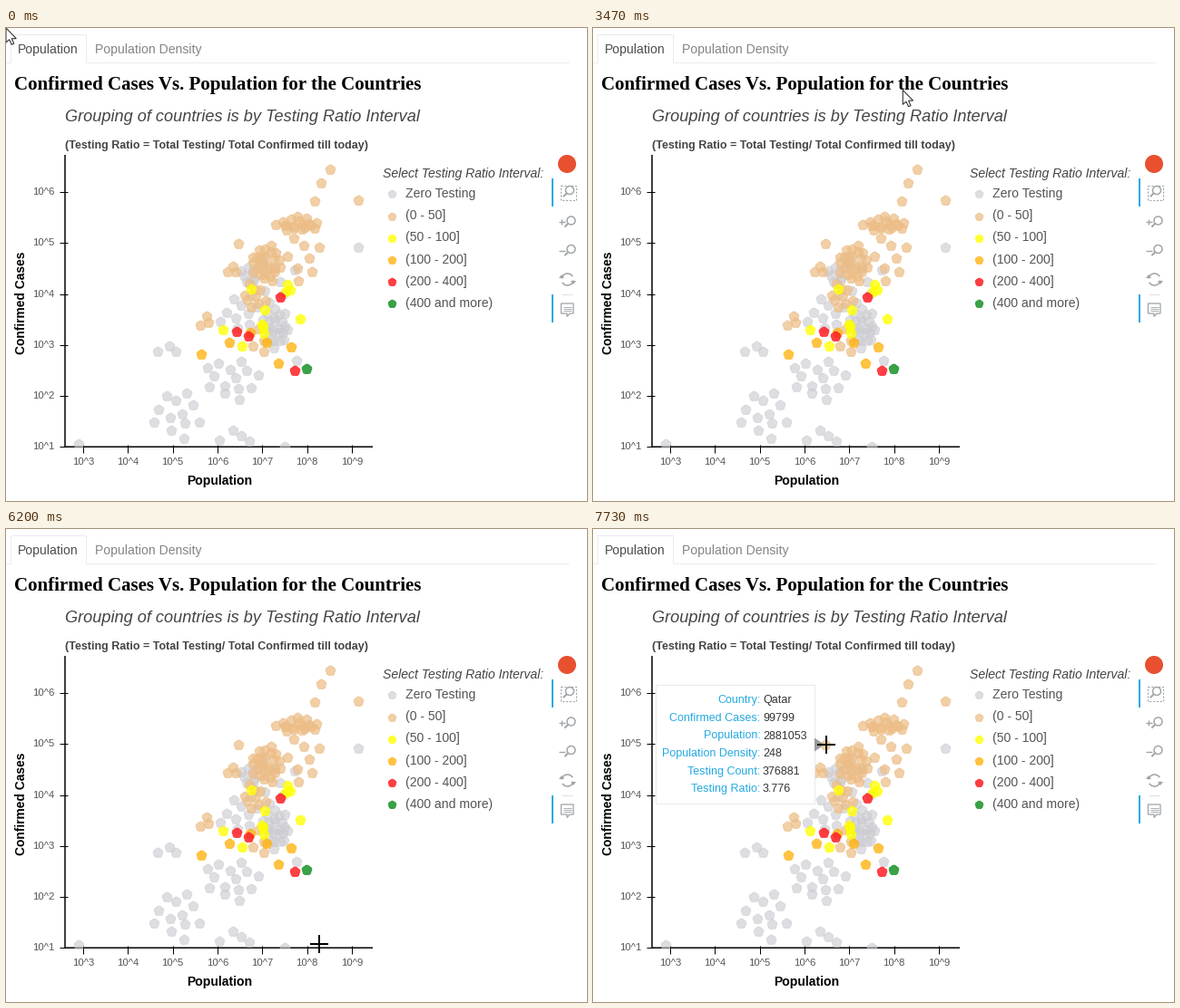
A matplotlib script that plays this animation: 640x522 px, repeating every 8 s.

```python
import numpy as np
import matplotlib.pyplot as plt
from matplotlib.animation import FuncAnimation
from matplotlib.patches import Arc, Circle, Polygon, Rectangle
from matplotlib.path import Path

W, H, DPI = 640, 522, 64
PX = 72 / DPI                      # points per pixel
FRAMES, STEP = 120, 200 / 3        # 8 seconds

BLUE, ICON, TAB = "#26aae1", "#a1a6a9", "#ececec"
LEFT, RIGHT, TOP, BOTTOM = 65, 403, 140, 462

fig = plt.figure(figsize=(W / DPI, H / DPI), dpi=DPI, facecolor="white")
ax = fig.add_axes([0, 0, 1, 1])
ax.set(xlim=(0, W), ylim=(H, 0))
ax.axis("off")


def text(x, y, s, size, color="#444444", family="Liberation Sans", **kw):
    return ax.text(x, y, s, fontsize=size * PX, color=color, family=family, **kw)


def line(xs, ys, color="black", width=1.0, **kw):
    return ax.plot(xs, ys, color=color, lw=width * PX,
                   solid_capstyle="butt", **kw)[0]


def patch(shape):
    return ax.add_patch(shape)


# ---- tabs and headings
line([0, 4.5, 4.5, 87.5, 87.5, 620], [37.5, 37.5, 6.5, 6.5, 37.5, 37.5], TAB)
text(13, 28, "Population", 14, "#4d4d4d")
text(98, 28, "Population Density", 14, "#858585")
text(9, 68, "Confirmed Cases Vs. Population for the Countries", 21.05, "black",
     "Liberation Serif", weight="bold")
text(65, 103, "Grouping of countries is by Testing Ratio Interval", 18.1,
     style="italic")
text(65, 132.5, "(Testing Ratio = Total Testing/ Total Confirmed till today)",
     12.55, weight="bold")

# ---- axes
line([65, 65], [TOP, BOTTOM + 1], width=1.5, snap=False)
line([LEFT, RIGHT + 1], [462.2, 462.2], width=1.5, snap=False)
for i in range(7):
    x = 85 + 49.3 * i
    line([x, x], [460, 469])
    text(x, 482, f"10^{i + 3}", 11.2, "#555555", ha="center")
for i in range(6):
    y = 462.2 - 56.2 * i
    line([58.5, 67.5], [y, y])
    text(53.5, y + 3, f"10^{i + 1}", 11.2, "#555555", ha="right")
text(235, 503.6, "Population", 14, "black", weight="bold", ha="center")
text(17, 303, "Confirmed Cases", 13.8, "black", weight="bold", rotation=90,
     ha="center", va="center")

# ---- data: a few key points per group, the rest scattered in ellipses
rng = np.random.default_rng(5)


def blob(n, x, y, rx, ry):
    """Spread n points over an ellipse by the golden angle, slightly shaken."""
    k = np.arange(n)
    rad, ang = np.sqrt((k + 0.5) / n), 2.4 * k
    shake = rng.uniform(-2, 2, (n, 2))
    return list(np.column_stack([x + rx * rad * np.cos(ang),
                                 y + ry * rad * np.sin(ang)]) + shake)


zero = ([(80, 459), (388, 242), (320, 367), (307, 462)]
        + blob(22, 297, 331, 14, 23) + blob(12, 260, 315, 28, 24)
        + blob(7, 267, 269, 13, 10) + blob(8, 295, 280, 30, 28)
        + blob(14, 247, 388, 32, 26) + blob(12, 188, 425, 30, 28)
        + blob(3, 178, 356, 22, 4) + blob(4, 250, 450, 32, 8))
low = ([(357, 156), (347, 171), (340, 191), (388, 190), (256, 238)]
       + blob(18, 322, 217, 24, 8) + blob(26, 287, 260, 17, 20)
       + blob(8, 328, 255, 26, 28) + blob(9, 272, 296, 14, 15)
       + blob(3, 250, 267, 8, 4) + blob(3, 218, 325, 9, 10)
       + blob(4, 278, 346, 14, 16))
mid = ([(270, 288), (324, 321), (239, 333), (260, 351)]
       + blob(3, 312, 288, 5, 4) + blob(4, 283, 325, 3, 16))
high = [(215, 360), (246, 347), (269, 336), (287, 347), (314, 352), (300, 370)]
top = [(302, 297), (254, 335), (267, 340), (318, 378)]

GROUPS = [
    ("Zero Testing", "#cbcbd1", 0.62, zero),
    ("(0 - 50]", "#ecbd86", 0.72, low),
    ("(50 - 100]", "#ffff00", 0.78, mid),
    ("(100 - 200]", "#ffb414", 0.8, high),
    ("(200 - 400]", "#ff1e24", 0.85, top),
    ("(400 and more)", "#179227", 0.85, [(331, 376)]),
]

a = np.linspace(0, 2 * np.pi, 81)
r = 0.78 + 0.22 * np.sqrt(np.abs(np.cos(2.5 * a)))
flower = Path(np.column_stack([r * np.sin(a), r * np.cos(a)]), closed=True)
plot_area = Rectangle((LEFT, TOP), RIGHT - LEFT, BOTTOM - TOP + 1,
                      transform=ax.transData)


def flowers(points, color, alpha, size):
    xs, ys = zip(*points)
    return ax.scatter(xs, ys, s=(size * PX) ** 2, marker=flower, facecolor=color,
                      edgecolor=color, linewidth=0.8 * PX, alpha=alpha, zorder=3)


text(415, 165, "Select Testing Ratio Interval:", 14, style="italic")
for i, (label, color, alpha, points) in enumerate(GROUPS):
    y = 182.8 + 24.2 * i
    flowers(points, color, alpha, 11).set_clip_path(plot_area)
    flowers([(424.5, y + 0.5)], color, alpha, 8.8)
    text(440, y + 4.2, label, 14, "#555555")


# ---- toolbar
def lens(x, y, radius=4.5):
    patch(Circle((x, y), radius, fill=False, ec=ICON, lw=1.5 * PX))
    d = radius * 0.7
    line([x - d, x - d - 4], [y + d, y + d + 4], ICON, 2)


patch(Circle((618, 150), 10, fc="#e8502f", ec="none"))
for y in (166, 294):
    line([602, 602], [y, y + 31], BLUE, 2)
patch(Rectangle((610.5, 173.5), 17, 16, fill=False, ec=ICON, lw=1.1 * PX,
                ls=(0, (2, 1.5))))
lens(621, 179)
for y in (213, 244.5):
    lens(622.5, y - 0.5)
    line([609, 615.5], [y + 1, y + 1], ICON, 1.4)
line([612.2, 612.2], [210.8, 217.2], ICON, 1.4)
for side in (-1, 1):
    start = 10 if side < 0 else 190
    patch(Arc((618.5, 277.5), 13, 13, theta1=start, theta2=start + 140,
              ec=ICON, lw=1.6 * PX))
    x, y = 618.5 - 6.5 * side, 277.5 - 1.5 * side
    patch(Polygon([(x - 3, y), (x + 3, y), (x, y - 4 * side)], fc=ICON, ec="none"))
line([612, 624], [293.5, 293.5], "#e0e0e0")
patch(Polygon([(611.5, 304), (625, 304), (625, 315), (621, 315), (618, 318.5),
               (618, 315), (611.5, 315)], fill=False, ec=ICON, lw=1.3 * PX))
for y in (307.5, 309.8, 312):
    line([614, 622.5], [y, y], ICON, 0.9)

# ---- tooltip
ROWS = {"Country": "Qatar", "Confirmed Cases": 99799, "Population": 2881053,
        "Population Density": 248, "Testing Count": 376881,
        "Testing Ratio": 3.776}
tip = [
    patch(Rectangle((68.5, 171.5), 175.5, 131, fc="white", ec="#e8e8e8",
                    lw=PX, alpha=0.95, zorder=6)),
    patch(Polygon([(244, 230.5), (244, 245.5), (255, 238)], fc="#9b9b9b",
                  ec="none", zorder=6)),
]
for i, (key, value) in enumerate(ROWS.items()):
    y = 192.3 + 19.6 * i
    tip.append(text(184.5, y, key + ":", 12.5, BLUE, ha="right", zorder=7))
    tip.append(text(187, y, value, 12.5, "#333333", zorder=7))

# ---- pointer: an arrow, or a cross inside the plot
ARROW = np.array([(0.5, 0.5), (0.5, 16.5), (4.2, 13.2), (6.7, 18.8), (9.2, 17.7),
                  (6.8, 12.2), (11.8, 12.2)])
arrow = patch(Polygon(ARROW, fc="white", ec="#333333", lw=1.1 * PX, zorder=9))
cross = [line([0, 0], [0, 0], width=2, zorder=9) for _ in range(2)]

# key poses: tick, x, y
TRACK = np.array([
    (18, 573, 249), (30, 52, 178), (37, 46, 67), (39, 46, 67), (43, 175, 70),
    (57, 390, 67), (67, 440, 73), (71, 440, 73), (76, 496, 140), (84, 419, 335),
    (89, 417, 350), (93, 345, 458), (96, 325, 488), (103, 308, 310),
    (115, 257, 238)], float)
T, P = TRACK[:, 0], TRACK[:, 1:]
SLOPE = np.gradient(P, T, axis=0)
still = np.all(np.diff(P, axis=0) == 0, axis=1)
SLOPE[:-1][still] = 0
SLOPE[1:][still] = 0
SLOPE[-1] = 0
HIDE, SHOW, HOVER = 6, 18, 115


def pointer(k):
    """Smooth Hermite path through the key poses."""
    k = min(k, T[-1])
    i = min(np.searchsorted(T, k, side="right") - 1, len(T) - 2)
    d = T[i + 1] - T[i]
    u = (k - T[i]) / d
    s = u * u * (3 - 2 * u)
    return (P[i] + s * (P[i + 1] - P[i])
            + d * u * (1 - u) * ((1 - u) * SLOPE[i] - u * SLOPE[i + 1]))


def draw(k):
    shown = k < HIDE or k >= SHOW
    x, y = pointer(k) if k >= SHOW else (-0.5, -0.5)
    inside = LEFT < x < RIGHT and TOP < y < BOTTOM
    arrow.set_visible(shown and not inside)
    arrow.set_xy(ARROW + (x, y))
    cx, cy = round(x), round(y)
    cross[0].set_data([cx - 10, cx + 10], [cy, cy])
    cross[1].set_data([cx, cx], [cy - 10, cy + 10])
    for part in cross:
        part.set_visible(shown and inside)
    for part in tip:
        part.set_visible(k >= HOVER)
    return [arrow, *cross, *tip]


ani = FuncAnimation(fig, draw, frames=FRAMES, init_func=lambda: draw(0),
                    interval=STEP, repeat=True, repeat_delay=0, blit=False)
plt.show()
```
